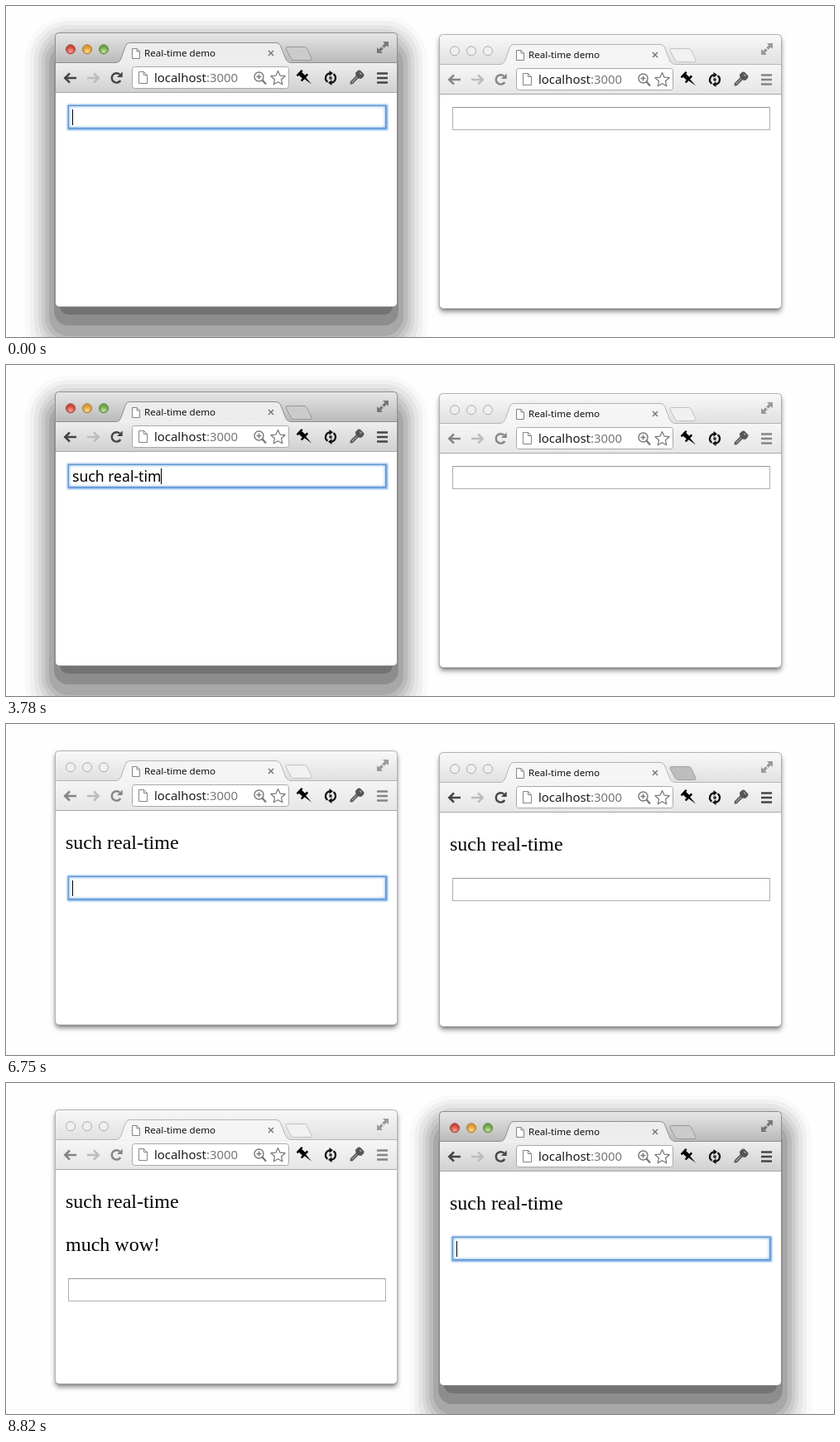
An HTML page for the animation above (8.85 s loop, 1000 by 400 pixels).

```html
<!DOCTYPE html>
<html lang="en">
<head>
<meta charset="utf-8">
<title>Real-time demo</title>
<style>
html, body { margin: 0; width: 100%; height: 100%; overflow: hidden; background: #fefefe; }
#stage { position: relative; width: 1000px; height: 400px; overflow: hidden; }
.win, .win svg { position: absolute; left: 0; top: 0; width: 1000px; height: 400px; overflow: visible; }
.win.second { left: 464px; top: 2px; }
svg text { font-family: "Noto Sans", "Open Sans", sans-serif; white-space: pre; }

/* window states */
.deep, .on .soft { display: none; }
.on .deep { display: inline; }
.soft { position: absolute; left: 60px; top: 33px; width: 412px; height: 330px; border-radius: 4px;
  box-shadow: 0 4px 6px rgba(0,0,0,.5), 0 1px 3px rgba(0,0,0,.25); }
.title { fill: url(#titleOff); }
.on .title { fill: url(#titleOn); }
.tools { fill: url(#toolsOff); }
.on .tools { fill: url(#toolsOn); }
.edge { fill: none; stroke: #b4b4b4; }
.on .edge { stroke: #8f8f8f; }
.tab { fill: #f5f5f5; stroke: #b5b5b5; }
.on .tab { fill: #ededed; stroke: #8e8e8e; }
.plus { fill: #f1f1f1; stroke: #c2c2c2; }
.armed .plus { fill: #bdbdbd; stroke: #a2a2a2; }
.on .plus { fill: #cbcbcb; stroke: #999; }
.light { fill: #efefef; stroke: #ababab; }
.on .red { fill: url(#red); stroke: #9c4038; }
.on .amber { fill: url(#amber); stroke: #a2762c; }
.on .green { fill: url(#green); stroke: #55803a; }
.nav { color: #858585; }
.armed .nav, .on .nav { color: #454545; }
.full { fill: #999; }
.on .full { fill: #777; }

/* page */
.msg { position: absolute; left: 72px; margin: 0; font: 24px/28px "Liberation Serif", "Times New Roman", serif; color: #000; white-space: pre; visibility: hidden; }
.msg.one { top: 129px; }
.msg.two { top: 181px; }
.field { position: absolute; left: 75px; top: 120px; width: 382px; height: 26px; background: #fff;
  border: 1px solid #b0b0b0; border-top-color: #979797; }
.field.focus { border-color: #5c93d0;
  box-shadow: 0 0 2px 1.5px #6ea6e2, inset 0 0 3px 1px #a4c9ef; }
.field span { position: absolute; left: 4px; top: 4px; height: 19px; white-space: pre; color: #000;
  font: 17.6px/19px "Noto Sans", "Open Sans", sans-serif; }
.field i { position: absolute; right: -1px; top: 0; width: 1px; height: 19px; background: #000; }
</style>
</head>
<body>
<div id="stage">
  <svg width="0" height="0" style="position:absolute">
    <defs>
      <linearGradient id="titleOn" x2="0" y2="1"><stop stop-color="#e6e6e6"/><stop offset="1" stop-color="#b9b9b9"/></linearGradient>
      <linearGradient id="titleOff" x2="0" y2="1"><stop stop-color="#f8f8f8"/><stop offset="1" stop-color="#e0e0e0"/></linearGradient>
      <linearGradient id="toolsOn" x2="0" y2="1"><stop stop-color="#efefef"/><stop offset="1" stop-color="#d0d0d0"/></linearGradient>
      <linearGradient id="toolsOff" x2="0" y2="1"><stop stop-color="#f6f6f6"/><stop offset="1" stop-color="#e6e6e6"/></linearGradient>
      <radialGradient id="red" cy=".75"><stop stop-color="#f7a296"/><stop offset="1" stop-color="#d2483c"/></radialGradient>
      <radialGradient id="amber" cy=".75"><stop stop-color="#fbdc92"/><stop offset="1" stop-color="#dd9a34"/></radialGradient>
      <radialGradient id="green" cy=".75"><stop stop-color="#c5e6a0"/><stop offset="1" stop-color="#6da546"/></radialGradient>
    </defs>
  </svg>
</div>
<script>
const LOOP = 8850;

// shadow bands, outermost first: side spread, top, bottom, radius, grey
const BANDS = [
  [37, -20, 78, 52, '#f9f9f9'], [31, -15, 70, 47, '#f0f0f0'], [26, -10, 62, 42, '#e5e5e5'],
  [21, -5, 54, 38, '#d8d8d8'], [17, 0, 48, 34, '#cacaca'], [13, 6, 42, 30, '#bababa'],
  [8, 13, 36, 24, '#a8a8a8'], [2, 20, 23, 17, '#8d8d8d'], [-5, 30, 10, 10, '#737373']
];

const band = ([s, top, bottom, r, grey]) =>
  `<rect x="${60 - s}" y="${33 + top}" width="${412 + 2 * s}" height="${330 - top + bottom}" rx="${r}" fill="${grey}"/>`;

const light = (x, name) => `<circle class="light ${name}" cx="${x}" cy="52.3" r="5.5"/>`;

const sheet = (x, y, w, h, c) =>
  `<path d="M${x} ${y}h${w - c}l${c} ${c}v${h - c}h${-w}zM${x + w - c} ${y}v${c}h${c}" fill="#fff" stroke="#858585"/>`;

function star(cx, cy, big, small) {
  const pts = [];
  for (let i = 0; i < 10; i++) {
    const r = i % 2 ? small : big, a = (i / 5 - .5) * Math.PI;
    pts.push((cx + r * Math.cos(a)).toFixed(1) + ',' + (cy + r * Math.sin(a)).toFixed(1));
  }
  return `<polygon points="${pts.join(' ')}" fill="#fff" stroke="#777" stroke-width="1.2" stroke-linejoin="round"/>`;
}

const arrow = (x, dir, colour) =>
  `<path transform="translate(${x} 87) scale(${dir} 1)" d="M-7 0H7.5M-.5 -5.6L-6.2 0L-.5 5.6" fill="none" stroke="${colour}" stroke-width="2.6"/>`;

const chrome = `
  <g class="deep">${BANDS.map(band).join('')}</g>
  <rect x="60" y="33" width="412" height="330" rx="4" fill="#fff"/>
  <path class="title" d="M60 69V37q0-4 4-4H468q4 0 4 4V69z"/>
  <rect class="tools" x="60" y="68" width="412" height="36"/>
  <path d="M60 104.5H472" stroke="#a8a8a8"/>
  <path class="tab" d="M60 68.5H133C137 68 138 66 139.500 62L144 49Q145.500 44.500 149 44.500H326Q330 44.500 331.500 48L337 62C338.500 66 340 68 344 68.500H472"/>
  <path d="M137 69H341" stroke="#f0f0f0"/>
  <path class="plus" d="M340 49.500H360Q362.500 49.500 363.500 51.500L369 63Q370 65.500 367 65.500H347.500Q345 65.500 344 63L338 52Q337.500 49.500 340 49.500z"/>
  ${light(78, 'red')}${light(98, 'amber')}${light(118, 'green')}
  <path class="full" d="M455 43h7v7l-2.300-2.300-3 3-2.400-2.400 3-3zM455 57h-7v-7l2.300 2.300 3-3 2.400 2.400-3 3z"/>
  ${sheet(152.5, 51.5, 9, 12, 3.5)}
  <text x="167" y="61" font-size="11.6" fill="#111">Real-time demo</text>
  <path d="M317 54l6 6M323 54l-6 6" stroke="#777" stroke-width="1.500"/>
  <g class="nav">
    ${arrow(77.5, 1, 'currentColor')}
    <path d="M138.300 90A5.700 5.700 0 1 1 137.300 82.700" fill="none" stroke="currentColor" stroke-width="2.400"/>
    <path d="M140.700 79.500V86H134z" fill="currentColor"/>
    <path d="M448 81.500H461M448 87H461M448 92.500H461" stroke="currentColor" stroke-width="2.600"/>
  </g>
  ${arrow(105.5, -1, '#bcbcbc')}
  <rect x="152.500" y="73.500" width="189" height="26" rx="3" fill="#fff" stroke="#a9a9a9"/>
  ${sheet(160.5, 79.5, 10, 14, 4)}
  <text x="179" y="92" font-size="14.9" fill="#1c1c1c">localhost<tspan fill="#777">:3000</tspan></text>
  <g fill="none" stroke="#777">
    <circle cx="305.500" cy="85.500" r="5.500" stroke-width="1.400"/>
    <path d="M309.500 89.500L314 94.500" stroke-width="2.200"/>
    <path d="M302.500 85.500h6M305.500 82.500v6" stroke-width="1.400"/>
  </g>
  ${star(328.5, 87.5, 9, 4.2)}
  <path transform="translate(361 87) rotate(43)" d="M-10-4.500h2.500v2h5.500v-3H.500v4.300L11 0 .500 1.200V5.500H-2v-3h-5.500v2H-10z"/>
  <g fill="none" stroke="#111" stroke-width="2.300">
    <path d="M388.500 91.800A5.800 5.800 0 0 1 391 81.300M395.500 82.200A5.800 5.800 0 0 1 393 92.700"/>
  </g>
  <path d="M390.500 78l4.500 3.300-4.500 3.500zM393.500 96l-4.500-3.300 4.500-3.500z" fill="#111"/>
  <circle cx="392" cy="87" r="1.900" fill="#333"/>
  <g transform="translate(424 86) rotate(45)" fill="#555">
    <path d="M-3.500-8.500h7l1.500 2v4.500L2 0V9.500L0 12-2 9.500V0L-5-2v-4.500z"/>
    <path d="M-1.500-6h3M0 0V9" stroke="#bbb"/>
  </g>
  <rect class="edge" x="59.500" y="32.500" width="413" height="331" rx="4"/>`;

function makeWindow(name) {
  const el = document.createElement('div');
  el.className = 'win ' + name;
  el.innerHTML = `<div class="soft"></div><svg viewBox="0 0 1000 400">${chrome}</svg>
    <p class="msg one">such real-time</p><p class="msg two">much wow!</p>
    <div class="field"><span><b style="font-weight:400"></b><i></i></span></div>`;
  document.getElementById('stage').append(el);
  const get = q => el.querySelector(q);
  const one = get('.one'), two = get('.two'), field = get('.field'), text = get('b'), caret = get('i');
  return s => {
    el.classList.toggle('on', s.active);
    el.classList.toggle('armed', !!s.armed);
    one.style.visibility = s.posts > 0 ? 'visible' : 'hidden';
    two.style.visibility = s.posts > 1 ? 'visible' : 'hidden';
    field.style.top = [120, 184, 236][s.posts] + 'px';
    field.classList.toggle('focus', s.focus);
    if (text.textContent !== s.text) text.textContent = s.text;
    caret.style.visibility = s.focus && s.caret ? 'visible' : 'hidden';
  };
}

const first = makeWindow('first'), second = makeWindow('second');

const CARET = [[0, 90], [600, 1110], [1230, 4320], [4560, 5070], [5580, 6060], [6510, 6780]];

// text typed so far, with the last key no later than `last`
function typed(text, t, start, step, last, sent) {
  if (t < start || t >= sent) return '';
  return t >= last ? text : text.slice(0, Math.floor((t - start) / step) + 1);
}

function draw(t) {
  const swapped = t >= 6780;
  first({
    active: t < 6750,
    focus: !swapped,
    caret: CARET.some(([a, b]) => t >= a && t < b),
    posts: (t >= 4620) + (t >= 8820),
    text: typed('such real-time', t, 1230, 210, 3870, 4560)
  });
  second({
    active: swapped,
    armed: t >= 6750 && !swapped,
    focus: swapped,
    caret: true,
    posts: +(t >= 4590),
    text: typed('much wow!', t, 7020, 190, 8540, 8790)
  });
}

const begin = performance.now();
function tick() {
  draw((performance.now() - begin) % LOOP);
  requestAnimationFrame(tick);
}
draw(0);
requestAnimationFrame(tick);
</script>
</body>
</html>
```
